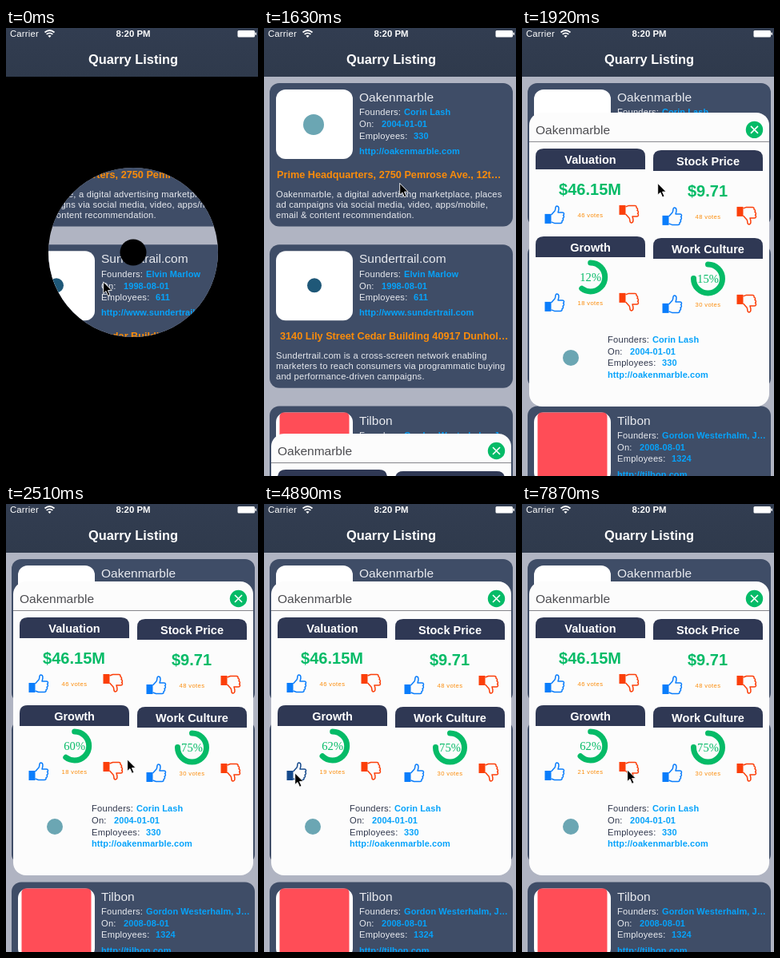
These frames come from a looping animation (315 by 561 pixels, 8 s). An HTML page:

```html
<!DOCTYPE html>
<html lang="en">
<head>
<meta charset="utf-8">
<title>Company cards</title>
<style>
html, body { margin: 0; width: 100%; height: 100%; overflow: hidden; background: #000; }
svg { display: block; width: 315px; height: 561px; }
text { font-family: "Liberation Sans", Arial, sans-serif; white-space: pre; }
.small { letter-spacing: .2px; }
.bold { font-weight: bold; }
.small.bold { letter-spacing: .08px; }
.votes { letter-spacing: .4px; }
.serif { font-family: "Liberation Serif", serif; }
</style>
</head>
<body>
<svg id="stage" viewBox="0 0 315 561"></svg>
<script>
const LOOP = 8000, TICK = LOOP / 54;
const BLUE = '#06a3fb', ORANGE = '#fb8c0a', GREEN = '#05bb67', NAVY = '#2f3854';
const PANEL_TOP = 97, POPUP_START = 1571, COUNT_START = 1780;

// Pointer stops: tick, x, y
const POINTER = [
  [0, 121, 317], [6, 121, 317], [9, 169, 193.5], [14, 169, 193.5], [17, 151, 319],
  [18, 67, 328], [20, 24.5, 342], [21, 24.5, 342], [24, 38, 336], [35, 38, 336],
  [38, 173, 316], [40, 143, 332], [46, 143, 332], [48, 131, 332], [54, 131, 332]
];

const COMPANIES = [
  {
    name: 'Oakenmarble', founder: 'Corin Lash', on: '2004-01-01', staff: 330,
    url: 'http://oakenmarble.com',
    address: 'Prime Headquarters, 2750 Pemrose Ave., 12t…', addressX: 16,
    about: ['Oakenmarble, a digital advertising marketplace, places',
      'ad campaigns via social media, video, apps/mobile,',
      'email &amp; content recommendation.'],
    mark: '<circle cx="62" cy="121" r="13" fill="#6ba6b3"/>'
  },
  {
    name: 'Sundertrail.com', founder: 'Elvin Marlow', on: '1998-08-01', staff: 611,
    url: 'http://www.sundertrail.com',
    address: '3140 Lily Street Cedar Building 40917 Dunhol…', addressX: 20,
    about: ['Sundertrail.com is a cross-screen network enabling',
      'marketers to reach consumers via programmatic buying',
      'and performance-driven campaigns.'],
    mark: '<circle cx="63" cy="120" r="9" fill="#1f5878"/>'
  },
  {
    name: 'Tilbon', founder: 'Gordon Westerhalm, J…', on: '2008-08-01', staff: 1324,
    url: 'http://tilbon.com', address: '', addressX: 16, about: [],
    mark: '<rect x="19.5" y="77" width="87" height="87" rx="5" fill="#ff4d57"/>'
  }
];

const clamp = (v, lo = 0, hi = 1) => Math.min(hi, Math.max(lo, v));
const MID = 'text-anchor="middle"';

function text(x, y, str, fill, size, extra = '') {
  return `<text x="${x}" y="${y}" fill="${fill}" font-size="${size}" ${extra}>${str}</text>`;
}
function bold(x, y, str, fill, size, extra = '') {
  return text(x, y, str, fill, size, `class="bold" ${extra}`);
}
function small(x, y, str, fill) {
  return text(x, y, str, fill, 11.2, 'class="small"');
}
function value(x, y, str) {
  return text(x, y, str, BLUE, 11, 'class="small bold"');
}

function facts(c, x, y, labelColor) {
  return small(x, y, 'Founders:', labelColor) + value(x + 56, y, c.founder) +
    small(x, y + 15, 'On:', labelColor) + value(x + 28, y + 15, c.on) +
    small(x, y + 29.5, 'Employees:', labelColor) + value(x + 68, y + 29.5, c.staff);
}

function card(c, i) {
  const ink = '#e9ebf0';
  return `<g transform="translate(0 ${i * 202.3})">
    <rect x="7" y="69" width="304" height="179.5" rx="12" fill="#3f4d67"/>
    <rect x="15" y="77" width="96" height="87" rx="12" fill="#fff"/>${c.mark}
    ${text(119, 92, c.name, ink, 15.5)}
    ${facts(c, 119, 109.3, ink)}
    ${value(119, 158, c.url)}
    ${bold(c.addressX, 187.5, c.address, ORANGE, 12.7)}
    ${c.about.map((line, n) => small(15, 212 + n * 13, line, ink)).join('')}
  </g>`;
}

function thumb(x, y, up, id = '') {
  const color = up ? '#0a7dfb' : '#fb3f0a';
  const flip = up ? '' : 'translate(0 24) scale(1 -1)';
  return `<g ${id} transform="translate(${x} ${y}) ${flip}" color="${color}">
    <rect x="0" y="11" width="8" height="12" fill="currentColor"/>
    <path d="M8 12L12.5 7C14 5 12.5 1 15 1C18 1 18 5 16.5 9H22C24.5 9 24.5 12 23 12.5
      C24.5 13.5 24 16 22.5 16.3C23.5 17.5 23 19.5 21.5 19.8C22 21.5 21 22.5 19.5 22.5H12L8 21"
      fill="none" stroke="currentColor" stroke-width="1.5" stroke-linejoin="round"/></g>`;
}

// One rating tile; x and y are its top left corner
function tile(x, y, title, votes, body, likeId = '', votesId = '') {
  return `<path d="M${x} ${y + 26}v-16q0-10 10-10h117q10 0 10 10v16z" fill="${NAVY}"/>
    ${bold(x + 68.5, y + 19, title, '#fff', 14.5, MID)}${body}
    ${thumb(x + 11.5, y + 71, true, likeId)}
    ${thumb(x + 104.5, y + 70, false)}
    ${text(x + 68.5, y + 86, votes, ORANGE, 7.6, `class="votes" ${MID} ${votesId}`)}`;
}

const RING = 18, ROUND = 2 * Math.PI * RING;
function gauge(id, x, y) {
  return `<circle id="${id}Ring" cx="${x}" cy="${y}" r="${RING}" fill="none" stroke="${GREEN}"
    stroke-width="7" stroke-linecap="round" transform="rotate(-90 ${x} ${y})"/>
    ${text(x, y + 5, '', GREEN, 14.6, `class="serif" id="${id}" ${MID}`)}`;
}

function price(x, y, str) {
  return bold(x, y, str, GREEN, 20, MID);
}

function popup() {
  const c = COMPANIES[0];
  return `<g id="popup">
    <rect x="9" width="300" height="368" rx="16" fill="#fcfcfc"/>
    ${text(17, 27, c.name, '#4c4c50', 15.5)}
    <path d="M9 36.5H309" stroke="#85858a"/>
    <circle cx="290.5" cy="21.5" r="10.7" fill="${GREEN}"/>
    <path d="M286 17l9 9m0-9l-9 9" stroke="#fff" stroke-width="1.6"/>
    ${tile(17, 45, 'Valuation', '46 votes', price(85, 103, '$46.15M'))}
    ${tile(164, 47, 'Stock Price', '48 votes', price(232, 105, '$9.71'))}
    ${tile(17, 155, 'Growth', '18 votes', gauge('growth', 85.7, 206), 'id="like"', 'id="votes"')}
    ${tile(164, 157, 'Work Culture', '30 votes', gauge('culture', 232.5, 208))}
    <circle cx="61" cy="307" r="10" fill="#6ba6b3"/>
    ${facts(c, 107, 288, '#30374c')}
    ${value(107, 332, c.url)}
  </g>`;
}

function bar() {
  return `<rect width="315" height="61" fill="url(#bar)"/>
    ${text(5, 11, 'Carrier', '#fff', 11.3, 'letter-spacing=".2"')}
    <g fill="none" stroke="#fff" stroke-width="1.7">
      <path d="M48.5 5.5q6-5 12 0M50.6 7.9q3.9-3.2 7.8 0"/></g>
    <path d="M52.4 9.7q2.1-1.5 4.2 0l-2.1 2.2z" fill="#fff"/>
    ${bold(159, 11, '8:20 PM', '#fff', 11.4, MID)}
    <rect x="289.5" y="3" width="21.5" height="8.5" rx="1.5" fill="#fff"/>
    <rect x="311.5" y="5.5" width="1.5" height="3.5" rx=".7" fill="#fff"/>
    ${bold(159, 45, 'Quarry Listing', '#fff', 16.4, MID)}`;
}

document.getElementById('stage').innerHTML = `
  <defs>
    <linearGradient id="bar" x2="0" y2="1">
      <stop stop-color="#323d51"/><stop offset="1" stop-color="#2f3a4c"/>
    </linearGradient>
    <clipPath id="iris"><circle id="irisHole" cx="159" cy="281"/></clipPath>
  </defs>
  <rect width="315" height="561"/>
  <g clip-path="url(#iris)">
    <rect y="61" width="315" height="500" fill="#b0b4c2"/>
    ${COMPANIES.map(card).join('')}
  </g>
  <circle id="dot" cx="159" cy="281"/>
  ${popup()}${bar()}
  <path id="pointer" d="M.7.9V15.5L4 12.5L6.5 18.3L9 17.2L6.5 11.6H11.2Z"
    fill="#000" stroke="#fff" stroke-width=".9"/>`;

const $ = id => document.getElementById(id);
const set = (id, name, value) => $(id).setAttribute(name, value);

function pointerAt(tick) {
  const n = POINTER.findIndex(p => p[0] > tick);
  const [t0, x0, y0] = POINTER[n - 1], [t1, x1, y1] = POINTER[n];
  const k = (tick - t0) / (t1 - t0);
  return [x0 + (x1 - x0) * k, y0 + (y1 - y0) * k];
}

// Critically damped spring, 1 at rest below and 0 when settled
function spring(ms) {
  const k = Math.max(0, ms) * .0172;
  return (1 + k) * Math.exp(-k);
}

function growthAt(tick, counted) {
  if (tick < 29) return [Math.floor(60 * counted), 18];
  if (tick < 34) return [62, 19];
  if (tick < 51) return [64, 20];
  return [64 - (tick - 51), 21];
}

function showGauge(id, percent, fill) {
  $(id).textContent = percent + '%';
  set(id + 'Ring', 'stroke-dasharray', `${ROUND * fill / 100} ${ROUND}`);
}

function draw(now) {
  const tick = Math.min(53, Math.floor((now % LOOP + 12) / TICK));
  const t = tick * TICK;

  set('irisHole', 'r', Math.min(400, 106 + .75 * t));
  set('dot', 'r', 16.5 * Math.pow(clamp(1 - t / 740), 1.4));
  set('popup', 'transform', `translate(0 ${PANEL_TOP + 561 * spring(t - POPUP_START)})`);
  set('pointer', 'transform', `translate(${pointerAt(tick)})`);

  const counted = clamp((t - COUNT_START) / 700);
  const [growth, votes] = growthAt(tick, counted);
  showGauge('growth', growth, Math.max(60, growth));
  showGauge('culture', Math.floor(75 * counted), 75);
  $('votes').textContent = votes + ' votes';
  set('like', 'color', tick === 33 ? '#164a8c' : '#0a7dfb');
}

function loop() {
  draw(performance.now());
  requestAnimationFrame(loop);
}
loop();
</script>
</body>
</html>
```
